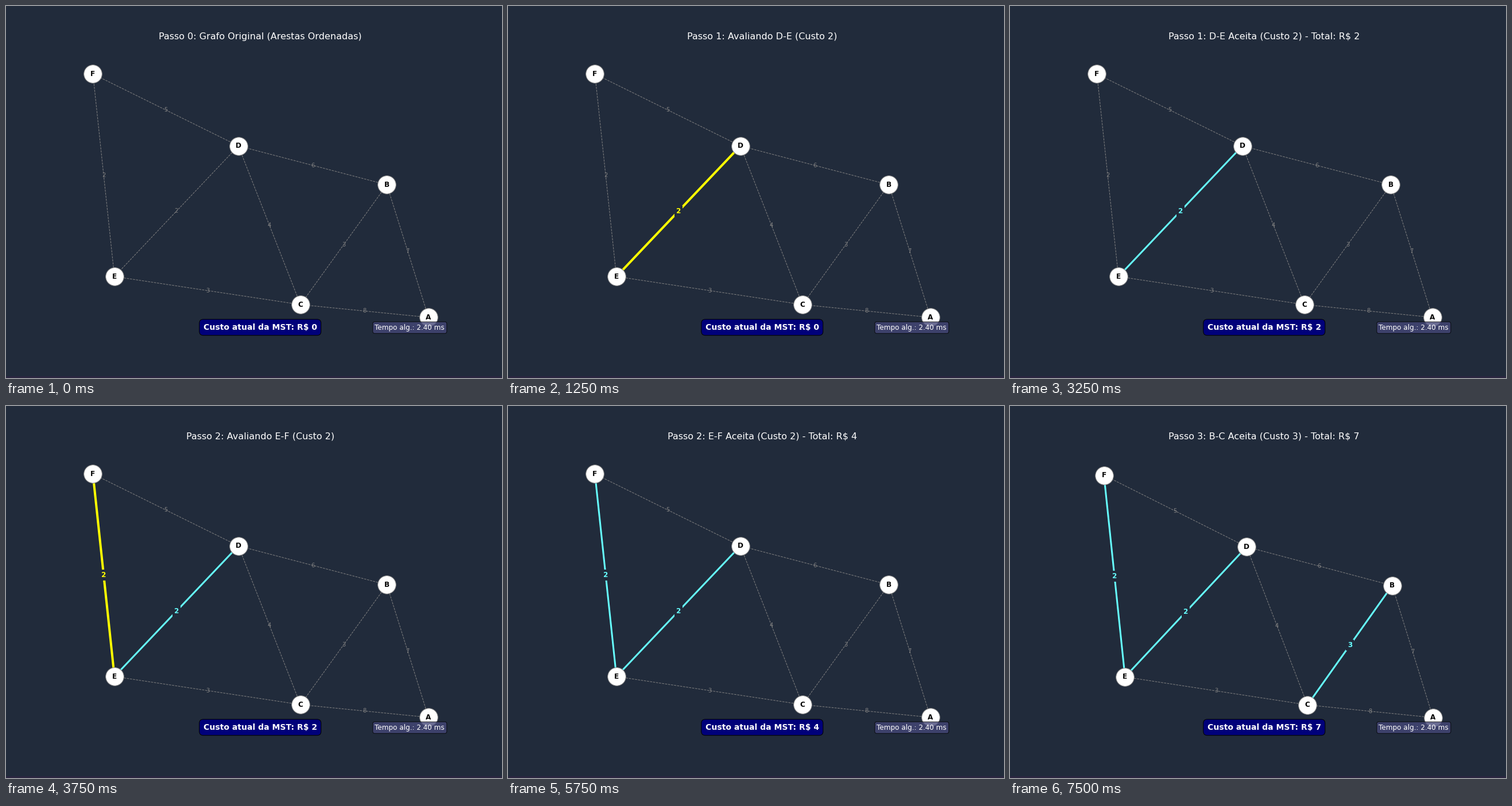
Write a matplotlib script that moves like this. It is 864 px wide and 648 px high and loops after 8000 ms.

```python
import matplotlib.pyplot as plt
from matplotlib.animation import FuncAnimation

W, H = 864, 648
BG = "#212b3b"
GRAY, YELLOW, CYAN = "gray", "#ffff00", "#66ffff"

NODES = {
    "A": (736.0, 542.4), "B": (663.4, 311.4), "C": (513.0, 520.2),
    "D": (404.8, 243.7), "E": (188.9, 471.2), "F": (151.4, 118.4),
}
EDGES = {"AB": 7, "AC": 8, "BC": 3, "BD": 6, "CD": 4,
         "CE": 3, "DE": 2, "DF": 5, "EF": 2}
ORDER = ["DE", "EF", "BC"]   # edges tried, cheapest first

INTERVAL = 250
HOLD = 5                     # ticks per stage
TICKS = 32

fig = plt.figure(figsize=(W / 72, H / 72), dpi=72, facecolor=BG)
ax = fig.add_axes([0, 0, 1, 1])


def layout(stage):
    """Node positions; the view rescales slightly at the last stage."""
    if stage < 6:
        return NODES
    x0, y0 = NODES["F"]
    return {n: (163.6 + (x - x0) * 0.9807, 120.5 + (y - y0) * 0.996)
            for n, (x, y) in NODES.items()}


def draw_edge(pos, edge, color, width, strong):
    (x0, y0), (x1, y1) = pos[edge[0]], pos[edge[1]]
    ax.plot([x0, x1], [y0, y1], color=color, lw=width,
            ls="-" if strong else "--", zorder=1.5 if strong else 1)
    style = {}
    if strong:
        style = dict(weight="bold",
                     bbox=dict(facecolor=BG, edgecolor="none", pad=3))
    ax.text((x0 + x1) / 2, (y0 + y1) / 2, str(EDGES[edge]), color=color,
            size=12 if strong else 10, ha="center", va="center",
            zorder=1.8, **style)


def draw_nodes(pos):
    for name, (x, y) in pos.items():
        ax.scatter([x], [y], s=1000, c="white", edgecolors=GRAY,
                   linewidths=1, zorder=2)
        ax.text(x, y, name, size=12, weight="bold", color="black",
                ha="center", va="center", zorder=3)


def caption(stage, step, total):
    if stage == 0:
        return "Passo 0: Grafo Original (Arestas Ordenadas)"
    edge = ORDER[step - 1]
    name, cost = "-".join(edge), EDGES[edge]
    if stage % 2:
        return f"Passo {step}: Avaliando {name} (Custo {cost})"
    return f"Passo {step}: {name} Aceita (Custo {cost}) - Total: R$ {total}"


def draw(tick):
    ax.clear()
    ax.set(xlim=(0, W), ylim=(H, 0))
    ax.axis("off")

    stage = tick // HOLD
    step = (stage + 1) // 2
    accepted = ORDER[:stage // 2]
    testing = ORDER[step - 1] if stage % 2 else None
    total = sum(EDGES[e] for e in accepted)
    pos = layout(stage)

    ax.axhspan(H - 3.5, H, color="#2a2640", lw=0)
    for edge in EDGES:
        if edge == testing:
            draw_edge(pos, edge, YELLOW, 4, True)
        elif edge in accepted:
            draw_edge(pos, edge, CYAN, 3, True)
        else:
            draw_edge(pos, edge, GRAY, 1, False)
    draw_nodes(pos)

    ax.text(442.8, 57.76, caption(stage, step, total), size=16,
            color="white", ha="center", va="baseline")
    ax.text(442.8, 566.74, f"Custo atual da MST: R$ {total}", size=14,
            weight="bold", color="white", ha="center", va="bottom", zorder=4,
            bbox=dict(boxstyle="round,pad=0.5", facecolor="#00007a",
                      edgecolor="black"))
    ax.text(764.2, 566.74, "Tempo alg.: 2.40 ms", size=12, color="white",
            ha="right", va="bottom", zorder=4,
            bbox=dict(boxstyle="round,pad=0.3", facecolor="#454778",
                      edgecolor="black", alpha=0.8))
    return []


anim = FuncAnimation(fig, draw, frames=TICKS, interval=INTERVAL,
                     init_func=lambda: draw(0), repeat=True, repeat_delay=0)
plt.show()
```
